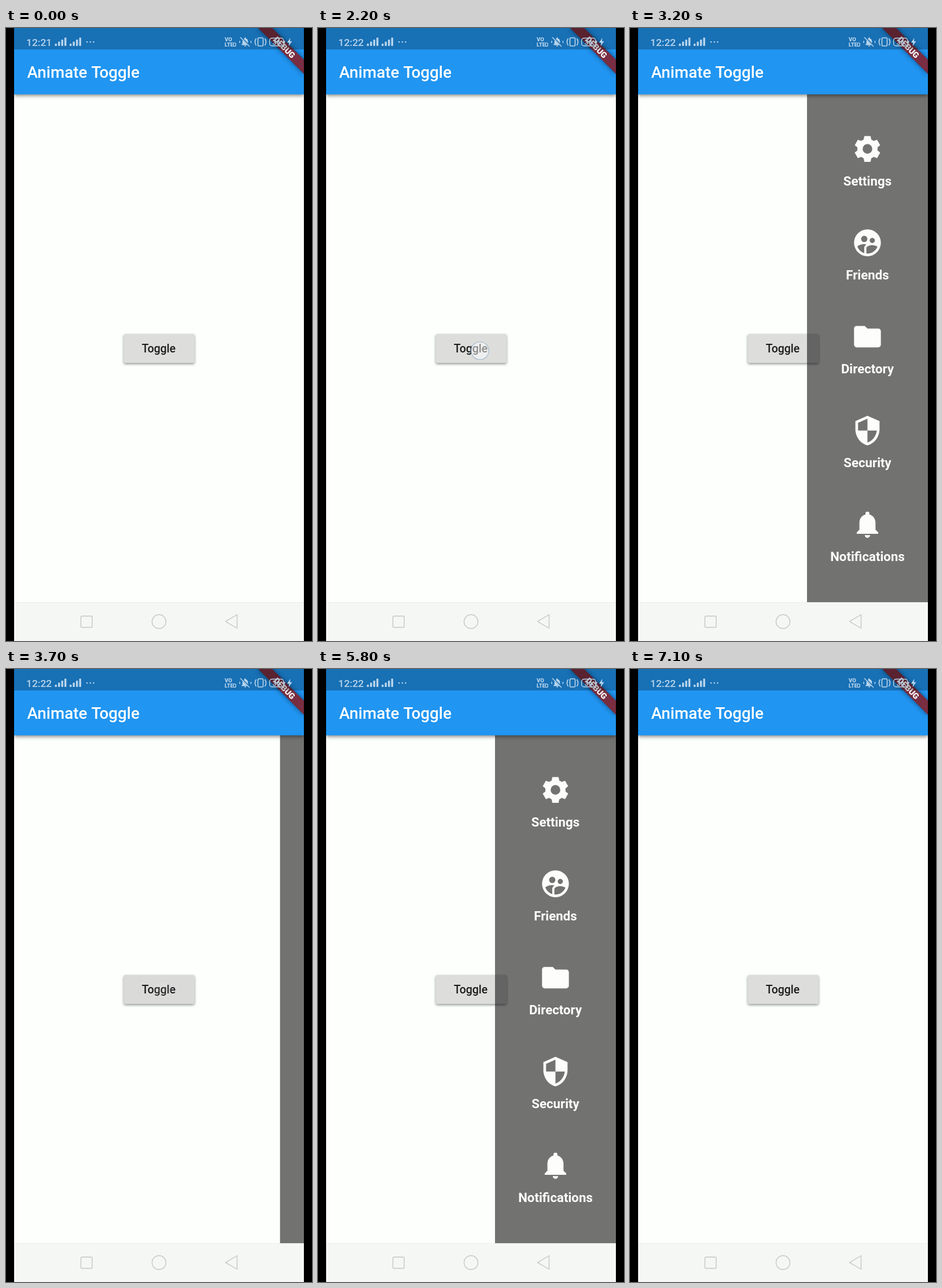
Recreate the animation shown at these times as an HTML page with a canvas. Size 529 by 1058 pixels, loop 7200 ms.

```html
<!DOCTYPE html>
<html lang="en">
<head>
<meta charset="utf-8">
<title>Animate Toggle</title>
<style>
  html, body { margin: 0; width: 100%; height: 100%; overflow: hidden; background: #000; }
  canvas { display: block; width: 529px; height: 1058px; }
</style>
</head>
<body>
<canvas id="stage" width="529" height="1058"></canvas>
<script>
const ctx = document.getElementById('stage').getContext('2d');
const LOOP = 7200, STEP = 100, SLIDE = 300, FADE = 180;
const LEFT = 14, RIGHT = 515, MENU_WIDTH = 209, DP = 501 / 360;
const STATUS_COLOR = '#b9d5ec';

// Each tap toggles the menu when the finger lifts.
const taps = [
  { down: 2150, up: 2280, x: 280, y: 557 },
  { down: 3430, up: 3550, x: 270, y: 554 },
  { down: 4910, up: 5000, x: 276, y: 555 },
  { down: 6050, up: 6150, x: 272, y: 555 }
];

const clamp = v => Math.max(0, Math.min(1, v));

function ease(p) {
  const bezier = (a, b, s) => 3 * a * s * (1 - s) ** 2 + 3 * b * s * s * (1 - s) + s ** 3;
  let lo = 0, hi = 1;
  for (let i = 0; i < 24; i++) {
    const mid = (lo + hi) / 2;
    if (bezier(0.25, 0.25, mid) < p) lo = mid; else hi = mid;
  }
  return bezier(0.1, 1, lo);
}

function openness(t) {
  return taps.reduce((sum, tap, i) => {
    const p = clamp((t - tap.up) / SLIDE);
    return sum + (i % 2 ? -1 : 1) * (p <= 0 ? 0 : p >= 1 ? 1 : ease(p));
  }, 0);
}

function gearPath() {
  const path = new Path2D();
  const tooth = [[-2.55, -6.9], [-2.15, -9.35], [2.15, -9.35], [2.55, -6.9]];
  for (let i = 0; i < 6; i++) {
    const c = Math.cos(i * Math.PI / 3), s = Math.sin(i * Math.PI / 3);
    for (const [x, y] of tooth) path.lineTo(12 + x * c - y * s, 12 + x * s + y * c);
  }
  path.closePath();
  path.moveTo(15.85, 12);
  path.arc(12, 12, 3.85, 0, Math.PI * 2);
  return path;
}

const items = [
  { label: 'Settings', path: gearPath(), outline: 0.5 },
  { label: 'Friends', path: new Path2D(
    'M2 12a10 10 0 1 0 20 0a10 10 0 1 0-20 0z' +
    'M13.67 10.27a1.93 1.93 0 1 0 3.86 0a1.93 1.93 0 1 0-3.86 0z' +
    'M7.24 9.12a2.36 2.36 0 1 0 4.72 0a2.36 2.36 0 1 0-4.72 0z' +
    'M9.6 15.89v3.75c-2.4-.75-4.3-2.6-5.14-4.96 1.05-1.12 3.67-1.69 5.14-1.69' +
    '.53 0 1.2.08 1.9.22-1.64.87-1.9 2.02-1.9 2.68z' +
    'M12 20c-.27 0-.53-.01-.8-.04v-4.07c0-1.42 2.94-2.13 4.4-2.13 1.07 0 2.92.39 3.84 1.15C18.28 17.88 15.39 20 12 20z') },
  { label: 'Directory', path: new Path2D(
    'M10 4H4c-1.1 0-2 .9-2 2V18c0 1.1.9 2 2 2h16c1.1 0 2-.9 2-2V8c0-1.1-.9-2-2-2h-8z') },
  { label: 'Security', path: new Path2D(
    'M12 1L3 5v6c0 5.55 3.84 10.74 9 12 5.16-1.26 9-6.45 9-12V5z' +
    'M12 12h7c-.53 4.12-3.28 7.79-7 8.94V12H5V6.3l7-3.11z') },
  { label: 'Notifications', path: new Path2D(
    'M12 22c1.1 0 2-.9 2-2h-4c0 1.1.9 2 2 2z' +
    'M18 16v-5c0-3.07-1.64-5.64-4.5-6.32V4a1.5 1.5 0 0 0-3 0v.68C7.63 5.36 6 7.92 6 11v5l-2 2v1h16v-1z') }
];

function text(str, x, y, size, weight, color, align = 'left') {
  ctx.font = `${weight} ${size}px Roboto, sans-serif`;
  ctx.textAlign = align;
  ctx.fillStyle = color;
  ctx.fillText(str, x, y);
}

function rect(x, y, w, h, color) {
  ctx.fillStyle = color;
  ctx.fillRect(x, y, w, h);
}

function rounded(x, y, w, h, r) {
  ctx.beginPath();
  ctx.roundRect(x, y, w, h, r);
}

function polyline(points) {
  ctx.beginPath();
  points.forEach(([x, y]) => ctx.lineTo(x, y));
}

function shadow(color, blur, dy) {
  ctx.shadowColor = color;
  ctx.shadowBlur = blur;
  ctx.shadowOffsetY = dy;
}

function isolated(draw) {
  ctx.save();
  draw();
  ctx.restore();
}

function drawButton(highlight) {
  isolated(() => {
    shadow('rgba(0,0,0,.42)', 4, 2);
    ctx.fillStyle = '#dddedc';
    rounded(203.5, 528, 122.5, 50, 3);
    ctx.fill();
  });
  if (highlight > 0) {
    ctx.fillStyle = `rgba(0,0,0,${highlight})`;
    rounded(203.5, 528, 122.5, 50, 3);
    ctx.fill();
  }
  text('Toggle', 264, 560, 14 * DP, 500, '#1c1d1c', 'center');
}

function drawMenu(open) {
  if (open <= 0) return;
  const x = RIGHT - MENU_WIDTH * open;
  rect(x, 114, MENU_WIDTH, 877, 'rgba(0,0,0,.55)');
  items.forEach(({ label, path, outline }, i) => {
    const center = x + MENU_WIDTH / 2, y = 208.7 + i * 162;
    isolated(() => {
      const scale = 40 * DP / 24;
      ctx.translate(center, y);
      ctx.scale(scale, scale);
      ctx.translate(-12, -12);
      ctx.fillStyle = ctx.strokeStyle = '#fdfefc';
      ctx.fill(path, 'evenodd');
      if (outline) {
        ctx.lineWidth = outline;
        ctx.lineJoin = 'round';
        ctx.stroke(path);
      }
    });
    text(label, center, y + 63.3, 16 * DP, 700, '#fdfefc', 'center');
  });
}

function drawAppBar() {
  isolated(() => {
    shadow('rgba(0,0,0,.45)', 6, 2.5);
    rect(LEFT, 0, RIGHT - LEFT, 114.5, '#2095f1');
  });
  text('Animate Toggle', 36.5, 86, 20 * DP, 500, '#fff');
}

function drawBanner() {
  isolated(() => {
    ctx.translate(RIGHT, 0);
    ctx.rotate(Math.PI / 4);
    ctx.scale(DP, DP);
    isolated(() => {
      shadow('rgba(0,0,0,.5)', 8, 0);
      rect(-40, 28, 80, 12, '#4b1b29');
    });
    rect(-40, 28, 80, 12, '#792d40');
    text('DEBUG', 0, 37.7, 10.2, 900, '#fff', 'center');
  });
}

function drawSignal(x) {
  for (let i = 0; i < 4; i++) {
    const h = 4 + i * 3.5;
    ctx.fillStyle = STATUS_COLOR;
    rounded(x + i * 5.5, 31 - h, 3.4, h, 1);
    ctx.fill();
  }
}

function drawMutedBell() {
  isolated(() => {
    ctx.translate(413.5, 24);
    ctx.scale(0.8, 0.8);
    ctx.translate(-12, -12.2);
    ctx.fillStyle = STATUS_COLOR;
    ctx.fill(items[4].path);
  });
  ctx.lineWidth = 3;
  ctx.strokeStyle = '#186fb4';
  polyline([[406, 16], [422, 32]]);
  ctx.stroke();
  ctx.lineWidth = 1.5;
  ctx.strokeStyle = STATUS_COLOR;
  polyline([[405, 16], [421, 32]]);
  ctx.stroke();
  rect(403.3, 22, 1.4, 4, STATUS_COLOR);
  rect(422.8, 22, 1.4, 4, STATUS_COLOR);
}

function drawVibration() {
  ctx.strokeStyle = STATUS_COLOR;
  ctx.lineWidth = 1.6;
  rounded(435.5, 17, 9, 14, 1.5);
  ctx.stroke();
  for (const side of [-1, 1]) {
    ctx.beginPath();
    ctx.moveTo(440 + side * 7.5, 18);
    ctx.quadraticCurveTo(440 + side * 11.5, 24, 440 + side * 7.5, 30);
    ctx.stroke();
  }
}

function drawStatusBar(t) {
  rect(LEFT, 0, RIGHT - LEFT, 37, 'rgba(0,0,0,.25)');
  text(t < 1100 ? '12:21' : '12:22', 35, 31, 17.4, 500, STATUS_COLOR);
  drawSignal(84.5);
  drawSignal(110);
  for (const x of [139, 144.7, 150.4]) rect(x, 23, 2.2, 2.2, STATUS_COLOR);

  text('VO', 378, 23, 9.6, 900, STATUS_COLOR);
  text('LTE', 378, 32, 9, 900, STATUS_COLOR);
  ctx.strokeStyle = STATUS_COLOR;
  ctx.lineWidth = 1.3;
  rounded(393.2, 25.8, 4, 5.6, 1);
  ctx.stroke();

  drawMutedBell();
  drawVibration();

  rounded(455.7, 17.5, 24, 13.3, 4);
  ctx.lineWidth = 1.4;
  ctx.stroke();
  rect(480.3, 22, 2, 4.5, STATUS_COLOR);
  text('36', 467.5, 28.6, 12, 500, STATUS_COLOR, 'center');
  polyline([[491.5, 17], [486, 25.3], [489.6, 25.3], [488.6, 31.5], [494.5, 22.8], [490.8, 22.8]]);
  ctx.fillStyle = STATUS_COLOR;
  ctx.fill();
}

function drawNavigation() {
  rect(LEFT, 991, RIGHT - LEFT, 67, '#f5f7f5');
  rect(LEFT, 991, RIGHT - LEFT, 1, '#eceeec');
  ctx.strokeStyle = '#c5c7c5';
  ctx.lineWidth = 1.4;
  rounded(129.5, 1015, 19.5, 19.5, 2);
  ctx.stroke();
  ctx.beginPath();
  ctx.arc(264.5, 1024.5, 12, 0, Math.PI * 2);
  ctx.stroke();
  ctx.lineJoin = 'round';
  polyline([[379.5, 1024.3], [399.5, 1012.5], [399.5, 1036]]);
  ctx.closePath();
  ctx.stroke();
}

function drawTouch({ x, y }, level) {
  isolated(() => {
    ctx.globalAlpha = level;
    ctx.beginPath();
    ctx.arc(x, y, 15.3, 0, Math.PI * 2);
    ctx.fillStyle = 'rgba(255,255,255,.5)';
    ctx.fill();
    ctx.strokeStyle = 'rgba(165,187,208,.75)';
    ctx.lineWidth = 1.6;
    ctx.stroke();
  });
}

function draw(t) {
  const tap = taps.find(({ down, up }) => t >= down && t < up + FADE);
  const level = tap ? 1 - clamp((t - tap.up) / FADE) : 0;
  const highlight = tap ? 0.08 * clamp((t - tap.down - 50) / 60) * level : 0;

  rect(0, 0, 529, 1058, '#000');
  isolated(() => {
    ctx.beginPath();
    ctx.rect(LEFT, 0, RIGHT - LEFT, 1058);
    ctx.clip();
    rect(LEFT, 0, RIGHT - LEFT, 1058, '#fdfffc');
    drawButton(highlight);
    drawMenu(openness(t));
    drawAppBar();
    drawBanner();
    drawStatusBar(t);
    drawNavigation();
    if (tap) drawTouch(tap, level);
  });
}

const start = performance.now();
function tick() {
  const t = (performance.now() - start) % LOOP;
  draw(Math.floor(t / STEP) * STEP);
  requestAnimationFrame(tick);
}
tick();
</script>
</body>
</html>
```
